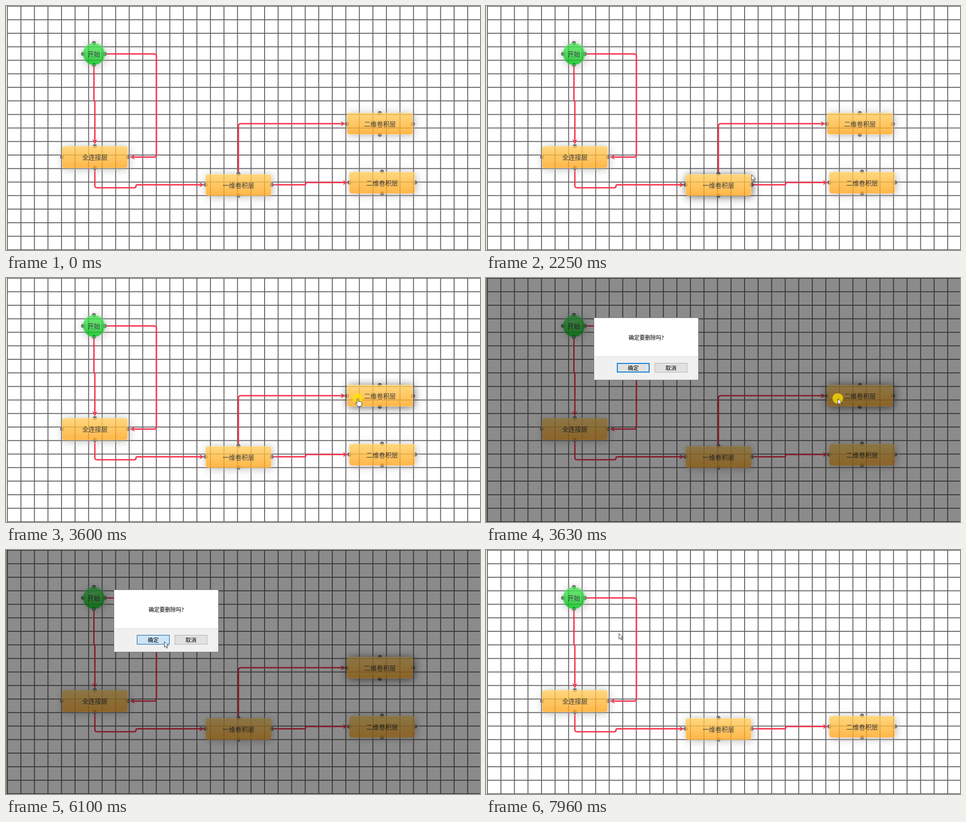
Animation, 1043 px wide and 537 px high, one loop 7990 ms. Source, as an HTML page:

```html
<!DOCTYPE html>
<html lang="zh-CN">
<head>
<meta charset="utf-8">
<title>Flow editor</title>
<style>
html, body { margin: 0; width: 100%; height: 100%; overflow: hidden; background: #fff; }
body { position: relative; font: 300 14px "Noto Sans CJK SC", "Noto Sans CJK", "Noto Sans", sans-serif; }
svg, .node, .box, .dot, #veil, #dialog, #dialog * { position: absolute; box-sizing: border-box; }
svg { left: 0; top: 0; }
.box { inset: 0; border-radius: 6px; opacity: .8; text-align: center; color: #111;
  background: linear-gradient(#ffce5f, #ffa51c);
  box-shadow: inset 0 0 0 1px rgba(255, 255, 255, .35), 2px 2px 19px #aaa; }
.round .box { border-radius: 50%; background: linear-gradient(#4ce65a, #01ba15); }
.hover .box { box-shadow: inset 0 0 0 1px rgba(255, 255, 255, .35), 2px 2px 19px #444; }
.dot { width: 9px; height: 9px; margin: -4.5px; border-radius: 50%; background: #606060; }
#veil { inset: 0; background: rgba(0, 0, 0, .455); }
#dialog { left: 237px; top: 87px; width: 231px; height: 138px; background: #fff;
  border: 1px solid #777; font-size: 12px; font-weight: 400; color: #000; text-align: center; }
#ask { left: 0; width: 100%; top: 33px; line-height: 20px; }
#foot { left: 0; bottom: 0; width: 100%; height: 52px; background: #f0f0f0; border-top: 1px solid #dfdfdf; }
.btn { top: 99px; width: 72px; height: 21px; line-height: 19px; background: #e1e1e1; border: 1px solid #adadad; }
#ok { left: 50px; border: 2px solid #0078d7; line-height: 17px; }
#ok.over { border: 1px solid #0078d7; background: #e5f1fb; line-height: 19px; }
#ok.down { border: 1px solid #005499; background: #cce4f7; line-height: 19px; }
#cancel { left: 133px; }
</style>
</head>
<body>
<svg id="back" width="1043" height="537"></svg>
<div id="nodes"></div>
<div id="veil"></div>
<div id="dialog">
  <div id="ask">确定要删除吗?</div>
  <div id="foot"></div>
  <div id="ok" class="btn">确定</div>
  <div id="cancel" class="btn">取消</div>
</div>
<svg id="front" width="1043" height="537">
  <circle id="click" r="11.5" fill="#ffe100" fill-opacity=".75"/>
  <path id="arrow" d="M.5 .5V13L3.4 10.4L5.4 15L7.4 14.2L5.4 9.7H9.4Z" fill="#fff" stroke="#333"/>
  <path id="hand" d="M-1.5 1.2Q0 -.8 1.5 1.2V6.5Q3 5.6 4.2 7Q5.8 6.2 6.8 7.6Q9 7 9.3 9.2V12Q9 14.5 7.5 16V18H-.5V16.5Q-3 14 -5 10.5Q-4.5 8.3 -1.5 11Z" fill="#fff" stroke="#222"/>
</svg>
<script>
const LOOP = 7990;
const OPEN = 3630, CLOSE = 6140;
const $ = id => document.getElementById(id);
const show = (el, on) => { el.style.display = on ? "" : "none"; };

function add(parent, tag, attrs) {
  const el = document.createElementNS("http://www.w3.org/2000/svg", tag);
  for (const k in attrs) el.setAttribute(k, attrs[k]);
  return parent.appendChild(el);
}

function drawGrid() {
  let d = "";
  for (let i = 0; i < 35; i++) d += `M${3 + i * 29.79} 0V537`;
  for (let i = 0; i < 19; i++) d += `M2 ${0.4 + i * 29.78}H1043`;
  add($("back"), "path", { d, stroke: "#626262", "stroke-width": 2 });
}

function link(d, x, y, angle) {
  const g = add($("back"), "g", {});
  add(g, "path", { d, fill: "none", stroke: "#f7354f", "stroke-width": 3 });
  add(g, "path", { d: "M0 0L-12 -5.5L-8 0L-12 5.5Z", fill: "#f7354f", transform: `translate(${x} ${y}) rotate(${angle})` });
  return g;
}

function node(label, x, y, w, h, round) {
  const el = document.createElement("div");
  el.className = round ? "node round" : "node";
  el.style.cssText = `left:${x}px;top:${y}px;width:${w}px;height:${h}px`;
  const dots = [[50, 0], [100, 50], [50, 100], [0, 50]]
    .map(([l, t]) => `<div class="dot" style="left:${l}%;top:${t}%"></div>`).join("");
  el.innerHTML = `${dots}<div class="box" style="line-height:${h}px">${label}</div>`;
  $("nodes").append(el);
  const inside = (p, pad) => p.x > x - pad && p.x < x + w + pad && p.y > y - pad && p.y < y + h + pad;
  return { el, inside };
}

drawGrid();
link("M193.5 130V206Q193.5 209 194.5 209T195.5 212V297", 195.5, 305, 90);
link("M218 105.5H326Q331 105.5 331 110.5V327Q331 332.5 326 332.5H280", 272, 332.5, 180);
link("M195.5 357V395Q195.5 400 200.5 400H282Q286 400 286 396.5T290 393.5H429", 437, 393.5, 0);
const doomedLink = link("M511.5 369V264Q511.5 259 516.5 259H740", 748, 259, 0);
link("M584 393.5H657Q659.5 393.5 659.5 391T662 388.5H745", 753, 388.5, 0);

const doomed = node("二维卷积层", 750, 235, 145.5, 48);
const nodes = [
  node("开始", 169, 81, 48.5, 48.5, true),
  node("全连接层", 123, 308, 145, 48.5),
  node("一维卷积层", 439, 369.5, 145, 48),
  doomed,
  node("二维卷积层", 755, 364.5, 145, 48)
];

// pointer track: time, x, y
const track = [
  [830, 820, 534], [1260, 678, 486], [1420, 676, 486], [1670, 676, 486],
  [1900, 585, 425], [2060, 545, 393], [2250, 584, 371], [2460, 625, 338],
  [3130, 774, 265], [4380, 774, 265], [4600, 590, 284], [4820, 409, 267],
  [5160, 356, 213], [5460, 348, 201], [7580, 348, 201], [7960, 292, 183]
];

function pointer(t) {
  const i = track.findIndex(k => k[0] > t);
  if (i < 0) return { x: 292, y: 183 };
  if (i === 0) return null;
  const [t0, x0, y0] = track[i - 1], [t1, x1, y1] = track[i];
  const u = (t - t0) / (t1 - t0);
  return { x: Math.round(x0 + (x1 - x0) * u), y: Math.round(y0 + (y1 - y0) * u) };
}

function render(t) {
  const p = pointer(t);
  const modal = t >= OPEN && t < CLOSE;
  const deleted = t >= CLOSE;
  let hand = false;

  for (const n of nodes) {
    const over = modal ? n === doomed : !!p && n.inside(p, 2);
    n.el.classList.toggle("hover", over);
    if (!modal && p && n.inside(p, -2)) hand = true;
  }
  show(doomed.el, !deleted);
  show(doomedLink, !deleted);
  show($("veil"), modal);
  show($("dialog"), modal);
  $("ok").className = "btn" + (t >= 5950 ? " down" : t > 5160 && p.y < 208 ? " over" : "");

  show($("click"), (t >= 3560 && t < 3790) || (t >= 5920 && t < 6100));
  show($("arrow"), p && !hand);
  show($("hand"), p && hand);
  if (p) {
    for (const id of ["click", "arrow", "hand"]) $(id).setAttribute("transform", `translate(${p.x} ${p.y})`);
  }
}

function tick() {
  render(performance.now() % LOOP);
  requestAnimationFrame(tick);
}
tick();
</script>
</body>
</html>
```
